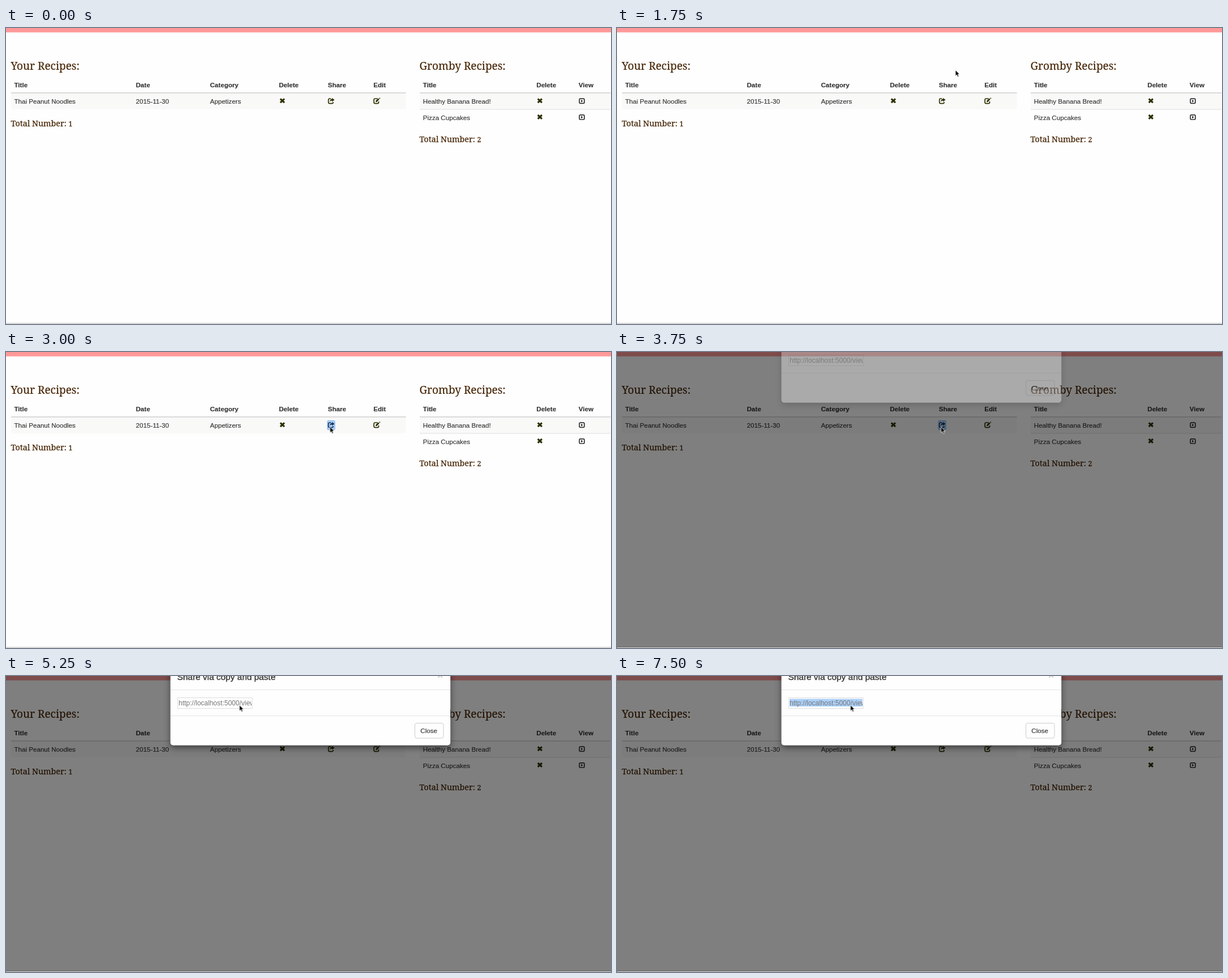
These frames come from a looping animation (1069x524 px, 8 s). An HTML page:

```html
<!DOCTYPE html>
<html lang="en">
<head>
<meta charset="utf-8">
<title>Recipe list</title>
<style>
  html, body { margin: 0; width: 100%; height: 100%; overflow: hidden; background: #fefefe; }
  svg { display: block; }
  text {
    font: 11.6px "Liberation Sans", Arial, sans-serif;
    fill: #333; stroke: #333; stroke-width: .15px; white-space: pre;
  }
  .head text { font-weight: bold; }
  .serif text { font-family: "Noto Serif", Georgia, serif; fill: #442200; stroke: #442200; }
  .serif .h3 { font-size: 19px; }
  .serif .h4 { font-size: 14.3px; stroke-width: .25px; }
  .serif .num { font-size: 12.6px; }
  .title { font-size: 15.4px; stroke-width: .35px; }
  .url { font-size: 12px; fill: #777; stroke: none; }
  .times { font-size: 17.5px; font-weight: bold; fill: #ccc; stroke: none; }
  .panel { filter: drop-shadow(0 4px 6px rgba(0, 0, 0, .5)); }

  /* Everything steps on a 250 ms grid: 3.125% of the loop. */
  .cursor, .shade, .modal, .select, .focus, .tint {
    animation: 8s step-end infinite;
  }
  .cursor { animation-name: cursor; }
  .shade { animation-name: shade; }
  .modal { animation-name: modal; }
  .select { animation-name: select; }
  .focus { animation-name: focus; }
  .tint { animation-name: tint; }

  @keyframes cursor {
    0% { opacity: 0; transform: translate(582px, 163px); }
    6.25% { opacity: 1; transform: translate(582.5px, 163.5px); }
    9.375% { opacity: 1; transform: translate(574.5px, 176.5px); }
    12.5% { opacity: 1; transform: translate(608px, 114.5px); }
    15.625% { opacity: 1; transform: translate(563.5px, 59.5px); }
    18.75% { opacity: 1; transform: translate(569px, 146.5px); }
    21.875% { opacity: 1; transform: translate(598px, 74.5px); }
    25% { opacity: 1; transform: translate(548px, 118px); }
    28.125% { opacity: 1; transform: translate(560.5px, 148.5px); }
    31.25% { opacity: 1; transform: translate(568.5px, 136px); }
    34.375% { opacity: 1; transform: translate(572.5px, 132.5px); }
    56.25% { opacity: 1; transform: translate(567.5px, 70.5px); }
    59.375% { opacity: 1; transform: translate(576.5px, 33.5px); }
    62.5% { opacity: 1; transform: translate(416.5px, 63.5px); }
    65.625%, 100% { opacity: 1; transform: translate(412.5px, 51.5px); }
  }
  @keyframes shade {
    0% { opacity: 0; }
    46.875%, 100% { opacity: 1; }
  }
  @keyframes modal {
    0% { opacity: 0; transform: translateY(-33px); }
    46.875% { opacity: .34; transform: translateY(-33px); }
    50%, 100% { opacity: 1; transform: none; }
  }
  @keyframes select {
    0% { opacity: 0; transform: translateX(111px); }
    75% { opacity: 1; transform: translateX(111px); }
    78.125%, 100% { opacity: 1; transform: none; }
  }
  @keyframes focus {
    0% { opacity: 0; }
    37.5% { opacity: 1; }
    50%, 100% { opacity: 0; }
  }
  @keyframes tint {
    0% { color: #2e3000; }
    37.5% { color: #1c355c; }
    56.25%, 100% { color: #2e3000; }
  }
</style>
</head>
<body>
<svg width="1069" height="524" viewBox="0 0 1069 524">
  <defs>
    <path id="remove" d="M-3.6-3.4 3.6 3.4M3.6-3.4-3.6 3.4" fill="none" stroke="#2e3000" stroke-width="3.2"/>
    <g id="share">
      <path d="M0-4.2H-2.5Q-4.6-4.2-4.6-2V2.4Q-4.6 4.5-2.5 4.5H1.6Q3.7 4.5 3.7 2.4V1.8" fill="none" stroke="currentColor" stroke-width="1.7"/>
      <path d="M1.8-5.4 6.2-2 1.8 1.4V-.7Q-.8-.7-2 1.6-2-3.3 1.8-3.4Z" fill="currentColor"/>
    </g>
    <g id="edit" color="#2e3000">
      <path d="M1.6-4.2H-2.8Q-4.9-4.2-4.9-2V2.4Q-4.9 4.5-2.8 4.5H1.4Q3.5 4.5 3.5 2.4V.8" fill="none" stroke="currentColor" stroke-width="1.7"/>
      <path d="M-2 2-1.5-.6 2.9-4.6 4.6-2.8.5 1.5ZM4-5 5.2-6 6.5-4.6 5.4-3.6Z" fill="currentColor"/>
    </g>
    <g id="view">
      <rect x="-4.4" y="-4.1" width="8.8" height="8.2" rx="1.8" fill="none" stroke="#333" stroke-width="1.7"/>
      <path d="M-1.5-2.3 2.2 0-1.5 2.3Z" fill="#333"/>
    </g>
    <clipPath id="field"><path d="M304 38H433.5V58H304Z"/></clipPath>
  </defs>

  <path d="M0 0H1069V524H0Z" fill="#fefefe"/>
  <path d="M0 0H1069V7.7H0Z" fill="#f99"/>
  <path d="M0 522H1069V523.5H0Z" fill="#ccc"/>

  <g class="serif">
    <text class="h3" x="8.5" y="74.3">Your Recipes:</text>
    <text class="h4" x="8.5" y="173.7">Total Number: <tspan class="num">1</tspan></text>
    <text class="h3" x="730.5" y="74.3">Gromby Recipes:</text>
    <text class="h4" x="730.5" y="202.3">Total Number: <tspan class="num">2</tspan></text>
  </g>

  <path d="M9 115H706.5V143.8H9ZM731 115H1068V143.8H731Z" fill="#f9f9f8"/>
  <path d="M9 114.9H706.5M731 114.9H1068" stroke="#d6d6d6" stroke-width="1.6"/>
  <path d="M731 144H1068" stroke="#ddd"/>

  <g class="head">
    <text x="14.5" y="104.5">Title</text>
    <text x="229.5" y="104.5">Date</text>
    <text x="360.5" y="104.5">Category</text>
    <text x="482.2" y="104.5">Delete</text>
    <text x="568.8" y="104.5">Share</text>
    <text x="649.3" y="104.5">Edit</text>
    <text x="736.8" y="104.5">Title</text>
    <text x="937.3" y="104.5">Delete</text>
    <text x="1011.7" y="104.5">View</text>
  </g>
  <text x="14.5" y="133.8">Thai Peanut Noodles</text>
  <text x="229.5" y="133.8">2015-11-30</text>
  <text x="360.5" y="133.8">Appetizers</text>
  <text x="736.8" y="133.8">Healthy Banana Bread!</text>
  <text x="736.8" y="162.5">Pizza Cupcakes</text>

  <rect class="focus" x="568" y="121.5" width="13" height="16" rx="2" fill="#add3fa" stroke="#7fb4ee" stroke-width="1.2"/>
  <use href="#remove" x="488.3" y="128.8"/>
  <use href="#share" class="tint" x="574.3" y="129.2"/>
  <use href="#edit" x="655" y="129.2"/>
  <use href="#remove" x="943.3" y="128.8"/>
  <use href="#remove" x="943.3" y="157.4"/>
  <use href="#view" x="1017.5" y="129.2"/>
  <use href="#view" x="1017.5" y="157.9"/>

  <path class="shade" d="M0 0H1069V523H0Z" fill="#000" fill-opacity=".5"/>

  <g class="modal">
    <rect class="panel" x="290.5" y="-30" width="494.7" height="152.7" rx="5" fill="#fefefe"/>
    <path d="M291 24.5H785M291 70.5H785" stroke="#e5e5e5"/>
    <text class="title" x="302.5" y="7">Share via copy and paste</text>
    <text class="times" x="762" y="5">×</text>
    <rect x="303.5" y="38.5" width="131.5" height="19" fill="#fefefe" stroke="#ddd"/>
    <g clip-path="url(#field)">
      <path class="select" d="M305 40.5H433.5V54H305Z" fill="#acd0f8"/>
      <text class="url" x="305" y="52">http://localhost:5000/view</text>
    </g>
    <rect x="722.5" y="83.5" width="50.5" height="26.5" rx="3.3" fill="#fefefe" stroke="#ccc"/>
    <text x="732.3" y="101">Close</text>
  </g>

  <path class="cursor" d="M0 0V10.4L2.4 8.2 4.1 12 5.9 11.2 4.3 7.5H7.5Z" fill="#000" stroke="#fff" stroke-width=".8"/>
</svg>
</body>
</html>
```
